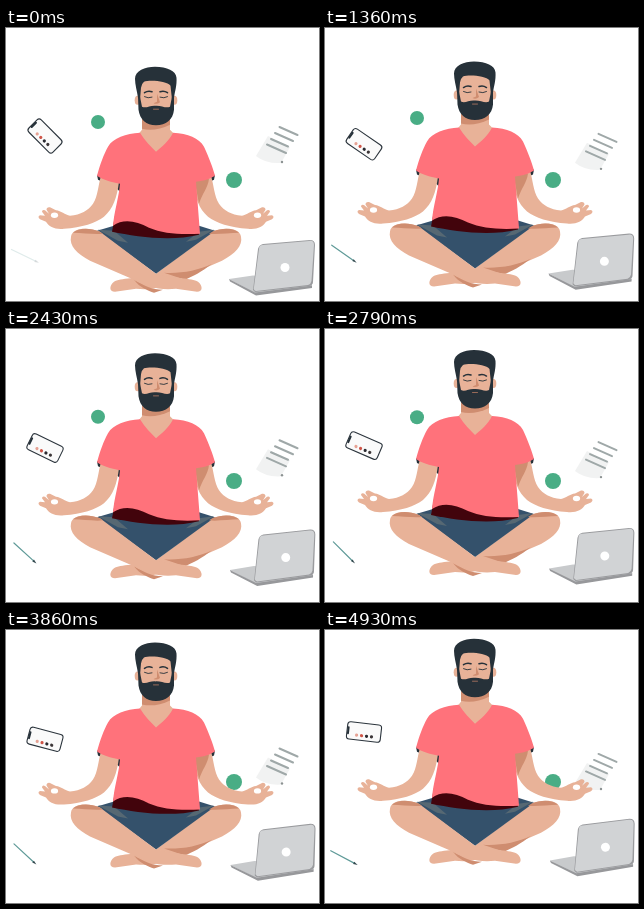
An HTML page that plays this animation: 313x273 px, repeating every 5000 ms.

```html
<!DOCTYPE html>
<html lang="en">
<head>
<meta charset="utf-8">
<title>Floating meditation</title>
<style>
  html, body { margin: 0; width: 100%; height: 100%; overflow: hidden; background: #fff; }
  svg { display: block; width: 100vw; height: 100vh; }
  .skin { fill: #e8b298; }
  .shade { fill: #cf8d70; }
  .dark { fill: #263139; }
  .line { fill: none; stroke-linecap: round; stroke-linejoin: round; }
</style>
</head>
<body>
<svg viewBox="0 0 313 273">
  <defs>
    <g id="arm">
      <path class="dark" d="M91 147L114 153V164L110 160L92 152Z"/>
      <path class="skin" d="M95 148L113 154C111 170 107 181 98 189C90 195 76 200 58 201C49 202 43 199 40 194L34 191.500Q31 189 34 187.500L39 188L36 184Q36 181.500 39 182.500L43 186L40.500 182Q40.500 179 44 179.500L50 182.500C55 183 59 187 64 188C75 187 82 183 87 176C92 168 92 158 95 148Z"/>
      <ellipse cx="48.500" cy="187.500" rx="3.600" ry="2.700" fill="#fff"/>
    </g>
    <path id="leg" class="skin" d="M65 209C63 218 71 226 84 233L128 252C140 258 152 263 170 261L191 264C197 264 197 258 192 254C186 250 168 251 150 246L94 204C82 199 66 200 65 209Z"/>
    <path id="kneeShade" class="shade" d="M67 205C72 200 84 200 93 203.500L97 206C88 207 77 205 67 205Z"/>
  </defs>

  <g id="paper">
    <path fill="#f1f2f2" d="M262 108L250 128Q260 136 275 135L284 119Z"/>
    <path class="line" stroke="#9fa8a8" stroke-width="2" d="M273.500 99L291.500 107M269 105L287 113M265 111L282 118.500M261 116.500L280 125"/>
    <circle cx="276" cy="134" r="1.200" fill="#8c9292"/>
  </g>

  <circle id="badge" cx="92" r="7" fill="#49ad85"/>
  <circle cx="228" cy="152" r="8" fill="#49ad85"/>

  <g id="phone">
    <rect x="-17" y="-8.700" width="34" height="17.400" rx="3" fill="#fafafa" stroke="#2b343c" stroke-width="1.100"/>
    <rect x="-16.800" y="-4" width="2" height="8" rx="1" class="dark"/>
    <g id="apps"></g>
  </g>

  <g id="pencil">
    <path class="line" stroke="#5f9a98" stroke-width="1.200" d="M-15 0H12"/>
    <path fill="#33484e" d="M11 -1.200L15.500 0L11 1.200Z"/>
  </g>

  <g id="laptop">
    <path fill="#c8cacc" d="M223 251L247 247.500L306 252V258L250 265.500Z"/>
    <path fill="#97989b" d="M223 251L249 264.500L306 257.500V260L250 267.500L224 253.500Z"/>
    <path fill="#9a9b9e" d="M257 216L304 212Q309 212 309 217L307 254Q307 257 303 258L249 264L247 262L252 221Q253 217 257 216Z"/>
    <path fill="#d1d3d5" d="M257 217L303 213Q308 212 308 217L305.500 253Q305 256 302 257L250 263Q247 262 248 259L253 221Q253 217 257 217Z"/>
    <circle cx="279" cy="239.500" r="4.500" fill="#fff"/>
  </g>

  <g id="man">
    <use href="#leg" transform="matrix(-1 0 0 1 300 0)"/>
    <path class="shade" d="M158 245C174 246 192 243 206 236C196 244 186 249 179 252Z"/>
    <path class="shade" d="M128 252C138 258 146 262 157 262L148 265C142 263 134 260 128 252Z"/>
    <path fill="#34516b" d="M91 203L108 198H193L209 203L150 246Z"/>
    <use href="#leg"/>
    <use href="#kneeShade"/>
    <use href="#kneeShade" transform="matrix(-1 0 0 1 300 0)"/>
    <path fill="#566873" d="M92 202L108 203L122 215L112 213ZM208 202L193 204L180 214L190 212Z"/>
    <use href="#arm"/>
    <use href="#arm" transform="matrix(-1 0 0 1 300 0)"/>
    <path class="shade" d="M188 150L203 151C202 160 196 166 193 176Z"/>
    <path class="skin" d="M136 84H164V102L170 108L150 126L131 108L136 102Z"/>
    <path class="shade" d="M136 91H164V97C154 102 144 103 136 101Z"/>
    <path fill="#42040c" d="M109 188H190L193 207C165 214 130 209 106 204Z"/>
    <path fill="#ff727b" d="M134 105C139 113 145 119 150 124C156 119 163 113 167 105C182 106 193 110 198 119C203 130 207 140 209 148C204 151 199 153 190 154L194 206C174 207 157 206 143 200C130 193 117 191 107 198C108 184 113 169 114 156C104 154 97 152 91 148C94 137 98 126 102 119C107 110 120 106 134 105Z"/>

    <ellipse class="skin" cx="131.500" cy="72.500" rx="2.800" ry="4.500"/>
    <ellipse class="skin" cx="168.500" cy="72.500" rx="2.800" ry="4.500"/>
    <path class="skin" d="M133 52H167V80C166 91 160 96 150 96C140 96 134 91 133 80Z"/>
    <path class="dark" d="M132 70C131 63 129 57 129 51C129 43 139 39 149 39C161 39 170 43 170.500 50C171 58 169 63 168 70L166 72L164.500 58C161 53 143 52 138 54Q135.500 56 135 60L134 72Z"/>
    <path class="dark" d="M132 69L134 69L136 79C140 81 144 77.500 149.500 78C155 77.500 160 81 164 79L166 69L168 69V82C167 92 160 97.500 150 97.500C140 97.500 134 92 132.500 82Z"/>
    <path class="shade" d="M151 66L154 74.500Q151 77 147.500 75.500L151 74Z"/>
    <g class="line" stroke="#263139">
      <path stroke-width="1.500" d="M138.500 65Q142 62.500 146 64M154 64Q158 62.500 161.500 65"/>
      <path stroke-width="0.900" d="M138.500 69Q142 71 146 69.500M154 69.500Q158 71 161.500 69"/>
      <path stroke="#b87a63" stroke-width="0.800" d="M147.500 81.500H152.500"/>
    </g>
  </g>
</svg>
<script>
  const LOOP = 5000, STEP = LOOP / 70;
  const el = id => document.getElementById(id);
  const move = (id, x, y, turn = "") => el(id).setAttribute("transform", `translate(${x} ${y}) ${turn}`);
  const mix = (a, b, p) => a + (b - a) * p;
  // Linear from a to b until the turning time, then on to c.
  const bend = (t, turn, a, b, c) => t < turn ? mix(a, b, t / turn) : mix(b, c, (t - turn) / (LOOP - turn));

  el("apps").innerHTML = ["#e6a294", "#cf5548", "#2a2a30", "#3a3436"]
    .map((c, i) => `<circle cx="${i * 5 - 7}" cy="4" r="1.600" fill="${c}"/>`).join("");

  function draw(now) {
    const t = Math.floor((now % LOOP + 5) / STEP) * STEP % LOOP;
    const p = t / LOOP;
    move("man", 0, -0.3 - 15 * (1 - Math.cos(Math.PI * p)));
    move("paper", 0, 25.3 * p);
    move("laptop", 1.5 * p, -22.5 * p, `rotate(${-2 * p} 275 240)`);
    move("phone", 39, bend(t, 2140, 108, 121, 101.5), `rotate(${mix(45, 6, p)})`);
    move("pencil", 19, bend(t, 3400, 228, 222.5, 228), `rotate(${bend(t, 3400, 26, 49, 27)})`);
    el("pencil").setAttribute("opacity", Math.min(1, 0.2 + t / 350));
    el("badge").setAttribute("cy", bend(t, 2200, 94, 87.5, 91));
    el("badge").setAttribute("visibility", t < 3550 ? "visible" : "hidden");
    requestAnimationFrame(() => draw(performance.now()));
  }
  draw(performance.now());
</script>
</body>
</html>
```
